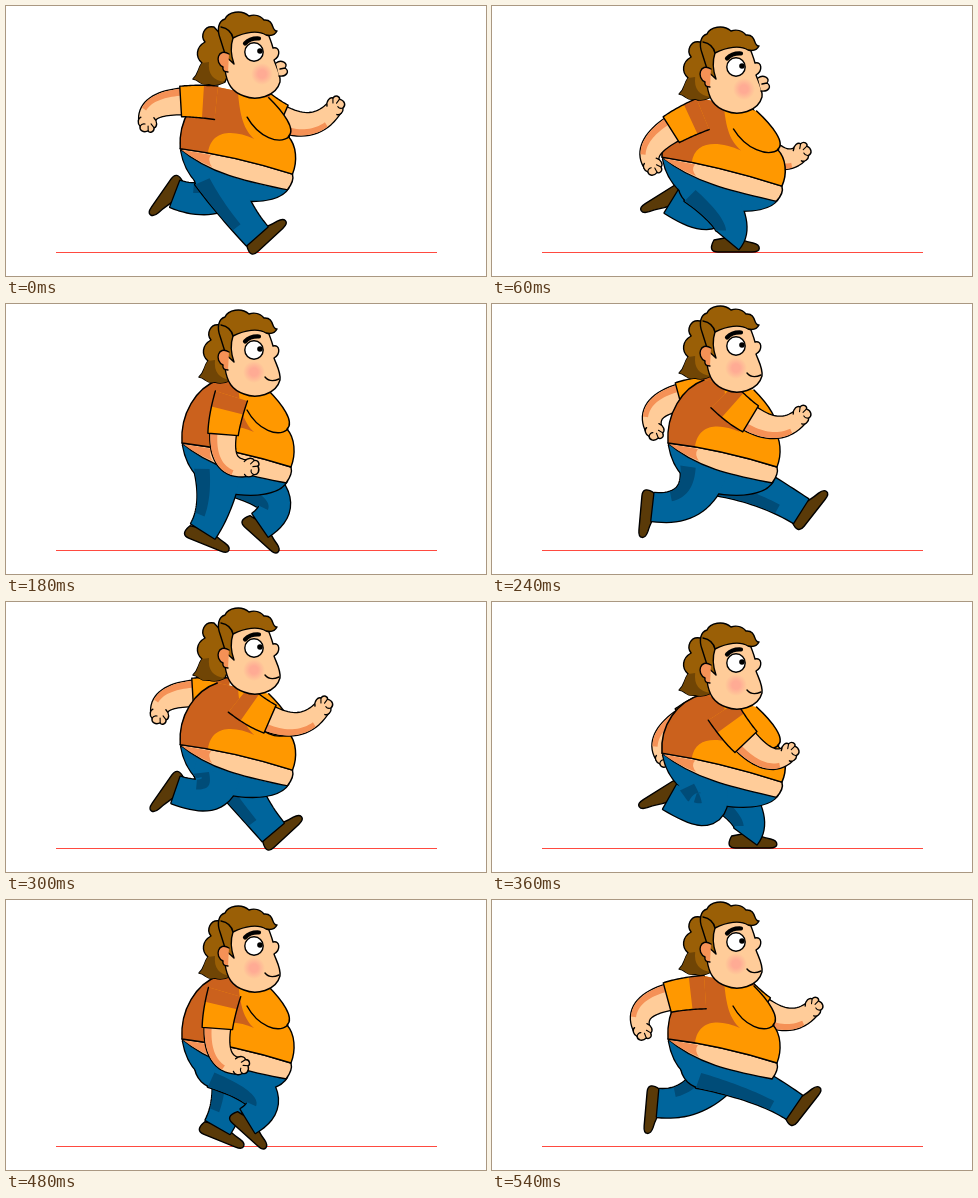
An HTML page with a canvas that plays this animation: 480 px wide and 270 px high, repeating every 600 ms.

```html
<!DOCTYPE html>
<html lang="en">
<head>
<meta charset="utf-8">
<title>Run cycle</title>
<style>
html, body { margin: 0; width: 100%; height: 100%; overflow: hidden; background: #fff; }
canvas { display: block; }
</style>
</head>
<body>
<canvas id="stage" width="480" height="270"></canvas>
<script>
const ctx = document.getElementById('stage').getContext('2d');
const LOOP = 600, STRIDE = LOOP / 2;
const STEPS = [0, 60, 120, 180, 210, 240]; // drawn moments of one stride
const KEYS = [0, 60, 180, 240];            // contact, squash, passing, flight
const SHIRT = '#ff9800', SHIRT_DARK = '#cb611d', SKIN = '#ffcc99', SKIN_DARK = '#f59156',
  JEANS = '#00659c', JEANS_DARK = '#004c78', HAIR = '#9a5f06', HAIR_DARK = '#704505', SHOE = '#5a3a08';

// Body bounce over one stride: squash, head x, head y.
const BOUNCE = [[.3, 4, 4], [1, 0, 19], [0, 4, 4], [0, 0, 0]];
// One leg over two strides: knee, ankle, shoe angle. The far leg runs half a loop later.
const LEG = [
  [228,200, 251,230, -43], [236,212, 236,234, 0], [208,200, 197,227, 22], [196,196, 161,203, 95],
  [203,191, 170,188, 125], [213,206, 178,195, 148], [254,195, 242,221, 42], [264,186, 302,207, -52]
];
// One arm over two strides: elbow, wrist.
const ARM = [
  [158,98, 141,116], [166,134, 160,159], [218,148, 243,164], [275,122, 309,112],
  [282,122, 317,105], [268,152, 297,151], [212,146, 233,166], [159,104, 150,130]
];

const mix = (a, b, k) => a + (b - a) * k;

function sample(track, t) {
  const time = i => KEYS[i % 4] + STRIDE * Math.floor(i / 4);
  t %= time(track.length);
  let i = track.length - 1;
  while (time(i) > t) i--;
  const next = track[(i + 1) % track.length];
  const k = (t - time(i)) / (time(i + 1) - time(i));
  return track[i].map((v, n) => mix(v, next[n], k));
}

function ink(shape, fill, width = 1.4) {
  if (typeof shape === 'string') shape = new Path2D(shape);
  if (fill) { ctx.fillStyle = fill; ctx.fill(shape); }
  if (width) { ctx.strokeStyle = '#000'; ctx.lineWidth = width; ctx.stroke(shape); }
}

// Outlines several shapes as one.
function merge(shapes, fill) {
  shapes.forEach(s => ink(s, null, 2.6));
  shapes.forEach(s => ink(s, fill, 0));
}

function disc(x, y, r) {
  const p = new Path2D();
  p.arc(x, y, r, 0, 7);
  return p;
}

function local(draw, x, y, angle = 0) {
  ctx.save();
  ctx.translate(x, y);
  ctx.rotate(angle);
  draw();
  ctx.restore();
}

// Parabola through three joints [x, y, radius].
function along(joints, t) {
  const [a, m, b] = joints;
  return a.map((v, i) => {
    const c = 2 * m[i] - (v + b[i]) / 2;
    return mix(mix(v, c, t), mix(c, b[i], t), t);
  });
}

function heading(joints, t) {
  const [x0, y0] = along(joints, t - .01), [x1, y1] = along(joints, t + .01);
  return Math.atan2(y1 - y0, x1 - x0);
}

// Part of a limb: from t0 to t1 along it, between two sides (-1 to 1).
function ribbon(joints, t0, t1, side0 = -1, side1 = 1) {
  const p = new Path2D(), N = 20;
  for (let i = 0; i <= 2 * N + 1; i++) {
    const there = i <= N;
    const t = mix(t0, t1, (there ? i : 2 * N + 1 - i) / N);
    const [x, y, r] = along(joints, t), a = heading(joints, t);
    const d = r * (there ? side0 : side1);
    p.lineTo(x - d * Math.sin(a), y + d * Math.cos(a));
  }
  return p;
}

function leg([kx, ky, ax, ay, angle], [hx, hy], far, pelvis = []) {
  const shift = far ? .4 * (ay - 190) : 0; // the far foot lands further on
  const joints = [[hx, hy, 24], [kx + shift, ky, 17], [ax + shift, ay, 14]];
  local(() => ink('M-14 0C-19 9 -16 12 -10 12L24 12C34 12 33 5 25 3C14 1 10 -3 2 -3Z', SHOE),
    ax + shift, ay, angle * Math.PI / 180);
  merge([...pelvis, disc(hx, hy, 23), ribbon(joints, 0, 1)], JEANS);
  ink(ribbon(joints, 0, .75, .35, 1), JEANS_DARK, 0);
}

function fist() {
  ink('M-4 -7C0 -11 5 -10 6 -7C11 -7 11 -2 9 -1C11 4 8 8 4 7C1 10 -4 9 -5 6', SKIN);
  ink('M9 -1L4 -1M6 -7L2 -4M4 7Q1 5 2 2', null, 1.1);
}

function arm([ex, ey, wx, wy], [sx, sy], far) {
  const dx = far ? 12 : 0, dy = far ? -4 : 0;
  const joints = [[sx + dx, sy + dy, 14], [ex + dx, ey + dy, 11.5], [wx + dx, wy + dy, 7.5]];
  merge([ribbon(joints, .2, 1)], SKIN);
  ink(ribbon(joints, .25, .8, .45, 1), SKIN_DARK, 0);
  local(fist, wx + dx, wy + dy, heading(joints, 1));
  const sleeve = t => ribbon(joints, 0, t, -1.2, 1.2);
  ink(sleeve(.3), SHIRT, 0);
  ink(sleeve(.1), SHIRT_DARK, 0);
  ink(sleeve(.3));
}

function torso() {
  ink('M176 139C205 165 245 172 280 179Q287 170 285 163C250 152 210 143 176 139Z', SKIN);
  ink('M177 140L206 145Q202 150 207 157Q190 150 177 140Z', SKIN_DARK, 0);
  ink('M212 76C190 84 174 110 176 139C210 143 250 152 285 163C290 150 289 134 281 125C289 118 276 100 262 86Z', SHIRT, 0);
  ink('M212 76C190 84 174 110 176 139L203 143C206 119 228 119 248 128C238 119 234 106 232 80Z', SHIRT_DARK, 0);
  ink('M212 76C190 84 174 110 176 139C210 143 250 152 285 163C290 150 289 134 281 125C289 118 276 100 262 86');
  ink('M282 125C272 134 252 126 241 106');
}

function head(pout, sway) {
  local(() => {
    ink('M222 30L210 17C200 15 196 26 201 32C192 37 191 47 198 53C193 60 195 64 189 69C196 70 196 76 205 74C210 76 215 75 221 72L230 50Z', HAIR);
    ink('M198 53C193 60 195 64 189 69C196 70 196 76 205 74C210 76 215 75 221 72Q203 70 205 52Z', HAIR_DARK, 0);
  }, sway, 0);
  ink('M215 60L222 24L254 14C260 28 262 34 263 38C270 36 271 46 264 50C266 56 271 64 270 72C266 87 246 91 234 86C222 82 217 74 215 60Z', SKIN);
  const x = pout ? 252 : 244, y = 64;
  const blush = ctx.createRadialGradient(x, y, 4, x, y, 11);
  blush.addColorStop(0, '#ffab94');
  blush.addColorStop(1, '#ffab9400');
  ink(disc(x, y, 11), blush, 0);
  if (pout) ink('M266 53C271 49 279 53 275 58C280 61 277 67 269 66M275 58L270 59', SKIN);
  else ink('M255 69Q260 75 269 71');
  ink('M267 21C261 22 265 9 254 10C249 4 242 5 239 6C231 -1 218 2 215 9C208 11 207 20 210 28L216 47Q221 51 224 54Q219 40 223 28C235 22 248 20 256 25Q264 27 267 21Z', HAIR);
  ink('M223 28Q221 19 211 17');
  ink('M219 44C208 37 204 53 213 57Q212 62 218 62', SKIN_DARK);
  ink(disc(244, 42, 9.2), '#fff');
  ink(disc(250, 41, 2.8), '#000', 0);
  ink('M235 33.5Q240 28 249 28.5', null, 4.2);
}

function draw(t) {
  const [squash, headX, headY] = sample(BOUNCE, t);
  const later = t + STRIDE;
  // Squashing widens the body, lowers it and tilts it forward.
  const bend = new DOMMatrix([1 + .1 * squash, .055 * squash, 0, 1 - .04 * squash, -23.6 * squash, 8 * squash]);
  const onBody = (x, y) => {
    const p = bend.transformPoint({ x, y });
    return [p.x, p.y];
  };
  const shoulder = time => onBody(222 - 11 * Math.cos(2 * Math.PI * time / LOOP), 92);
  const pelvis = new Path2D();
  pelvis.addPath(new Path2D('M177 141C181 165 196 186 232 190C260 193 276 186 281 177Z'), bend);

  ctx.fillStyle = '#fff';
  ctx.fillRect(0, 0, 480, 270);
  ctx.fillStyle = '#ff4a40';
  ctx.fillRect(50, 246, 381, 1);
  arm(sample(ARM, later), shoulder(later), true);
  leg(sample(LEG, later), onBody(228, 168), true);
  leg(sample(LEG, t), onBody(212, 165), false, [pelvis]);
  ctx.save();
  ctx.transform(bend.a, bend.b, bend.c, bend.d, bend.e, bend.f);
  torso();
  ctx.restore();
  arm(sample(ARM, t), shoulder(t), false);
  const sway = -6 * Math.max(0, Math.cos(2 * Math.PI * t / STRIDE));
  local(() => head(t < 120, sway), headX, headY);
}

ctx.lineJoin = ctx.lineCap = 'round';

function tick() {
  const t = performance.now() % LOOP, phase = t % STRIDE;
  draw(t - phase + STEPS.findLast(start => start <= phase));
  requestAnimationFrame(tick);
}
tick();
</script>
</body>
</html>
```
